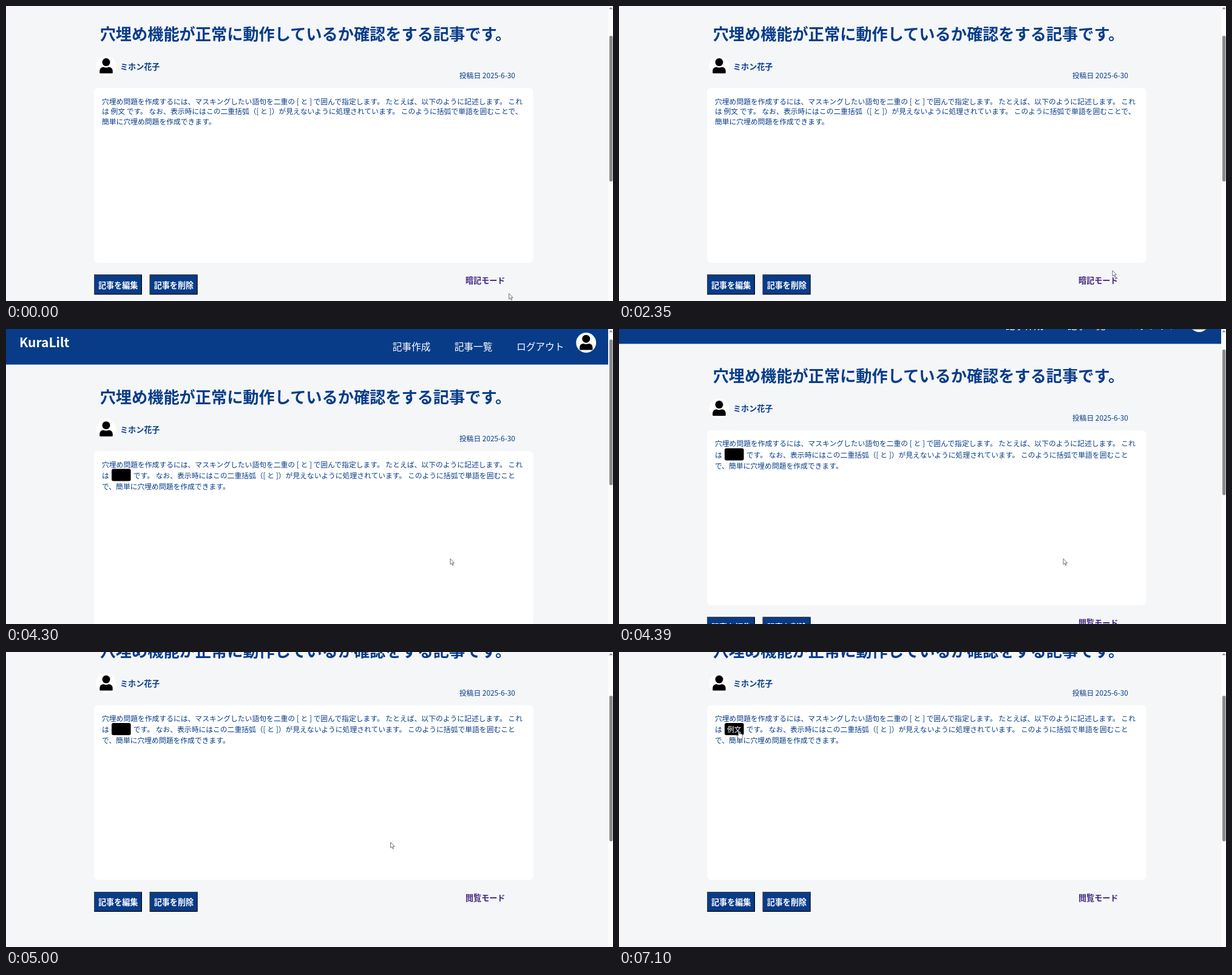
Recreate the animation shown at these times as an HTML page. Size 1000 by 486 pixels, loop 8000 ms.

```html
<!DOCTYPE html>
<html lang="ja">
<head>
<meta charset="utf-8">
<style>
html, body { margin: 0; width: 100%; height: 100%; overflow: hidden; background: #f4f6f8; }
svg { display: block; font: 11.8px "Noto Sans CJK JP", "Noto Sans CJK", sans-serif; fill: #083c89; }
.bold { font-size: 13.1px; font-weight: 700; }
.title { font-size: 26.2px; font-weight: 700; }
.logo { font-size: 21px; font-weight: 700; }
.nav { font-size: 15.7px; }
.white { fill: #fff; }
.link { fill: #45297f; }
.cursor { fill: #fff; stroke: #444; stroke-width: .75; stroke-linejoin: round; }
</style>
</head>
<body>
<svg width="1000" height="486" viewBox="0 0 1000 486">
  <defs>
    <g id="avatar">
      <circle r="16.5" fill="#fff"/>
      <circle cy="-6.4" r="6.5" fill="#000"/>
      <path d="M-10.8 11Q-11.6 1.6-4.5 1.4Q0 3.6 4.5 1.4Q11.6 1.6 10.8 11Q10.8 12 9.5 12H-9.5Q-10.8 12-10.8 11Z" fill="#000"/>
    </g>
    <g id="button">
      <rect width="79" height="33" fill="#000"/>
      <path d="M0 0H79L78 1H1V32L0 33Z" fill="#4a4a4a"/>
      <rect x="1" y="1" width="76.8" height="30.8"/>
    </g>
  </defs>
  <rect width="1000" height="486" fill="#f4f6f8"/>
  <g id="page">
    <rect width="992" height="76"/>
    <g class="white">
      <text class="logo" x="22" y="47.5">KuraLilt</text>
      <g class="nav">
        <text x="636.7" y="52">記事作成</text>
        <text x="738.7" y="52">記事一覧</text>
        <text x="841" y="52">ログアウト</text>
      </g>
    </g>
    <use href="#avatar" x="955.7" y="40"/>
    <text class="title" x="154.7" y="139">穴埋め機能が正常に動作しているか確認をする記事です。</text>
    <use href="#avatar" x="165" y="182.5"/>
    <text class="bold" x="188" y="188">ミホン花子</text>
    <text x="746.8" y="202.5">投稿日 2025-6-30</text>
    <rect x="145" y="218.5" width="723.5" height="288" rx="7" fill="#fff"/>
    <text x="158" y="245">穴埋め問題を作成するには、マスキングしたい語句を二重の [ と ] で囲んで指定します。 たとえば、以下のように記述します。 これ</text>
    <g id="reading">
      <text x="158" y="261.8">は 例文 です。 なお、表示時にはこの二重括弧（[ と ]）が見えないように処理されています。 このように括弧で単語を囲むことで、</text>
      <text x="158" y="278.6">簡単に穴埋め問題を作成できます。</text>
      <text class="bold link" x="757" y="540.5">暗記モード</text>
    </g>
    <g id="recall">
      <text x="158" y="263.2">は</text>
      <rect x="174" y="248" width="31.6" height="20" rx="3" fill="#000"/>
      <text id="answer" class="white" x="178" y="263.2">例文</text>
      <text x="209.8" y="263.2">です。 なお、表示時にはこの二重括弧（[ と ]）が見えないように処理されています。 このように括弧で単語を囲むこと</text>
      <text x="158" y="281.2">で、簡単に穴埋め問題を作成できます。</text>
      <text class="bold link" x="757" y="540.5">閲覧モード</text>
    </g>
    <use href="#button" x="145" y="526"/>
    <use href="#button" x="236.7" y="526"/>
    <g class="bold white">
      <text x="152" y="548">記事を編集</text>
      <text x="243.7" y="548">記事を削除</text>
    </g>
  </g>
  <rect x="992" width="8" height="486" fill="#fcfcfc"/>
  <path d="M993.3 5.3L996.5 2L999.7 5.3Z" fill="#8b8b8b"/>
  <rect id="thumb" x="994" width="5.5" height="240" rx="2.7" fill="#8b8b8b"/>
  <g id="cursor" class="cursor">
    <path id="arrow" d="M0 0V9.3L2.1 7.4L3.7 10.9L5.1 10.3L3.6 6.9H6.5Z"/>
    <path id="hand" d="M-1 6.5V.9Q0-.8 1 .9V4.2Q2 0 3 4.6Q4 3.7 4.7 5Q6 4.3 6.2 6V9Q6.2 10.5 5 12.5H-.6Q-1.5 10.5-3.6 7.6Q-3.4 5.4-1 7.6Z"/>
  </g>
</svg>
<script>
const LOOP = 8000, STEP = 70, SWAP = 3450;
const LINK = { x: 783, y: 456 };
const moves = [
  { from: 3880, to: 4300, x: 732, y: 378.5 },
  { from: 4930, to: 5350, x: 410, y: 217.5 },
  { from: 5560, to: 6120, x: 293.5, y: 180.5 },
  { from: 6260, to: 6470, x: 247, y: 155 },
  { from: 6610, to: 7100, x: 197.5, y: 130.5 }
];
const $ = id => document.getElementById(id);
const show = (id, on) => $(id).setAttribute('visibility', on ? 'visible' : 'hidden');
const move = (id, x, y) => $(id).setAttribute('transform', `translate(${x} ${y})`);
const progress = (t, from, to) => Math.min(1, Math.max(0, (t - from) / (to - from)));

// Two slowing turns around the link, closing in on it
function circleLink(t) {
  const p = progress(t, 380, 2900);
  const angle = .95 + 12.07 * (1 - (1 - p) ** 1.4);
  const radius = 1.12 * Math.sqrt(1 - p ** 3);
  return {
    x: LINK.x + 70 * radius * Math.cos(angle),
    y: LINK.y - 7 * (1 - p) + 27 * radius * Math.sin(angle)
  };
}

// Later moves slow down along a slight upward arc
function pointerAt(t) {
  let pos = circleLink(t);
  for (const { from, to, x, y } of moves) {
    const e = 1 - (1 - progress(t, from, to)) ** 2;
    const dx = x - pos.x, dy = y - pos.y;
    pos = { x: pos.x + dx * e, y: pos.y + dy * e + .06 * dx * Math.sin(Math.PI * e) };
  }
  return pos;
}

function scrollAt(t) {
  const p = progress(t, 4220, 4570);
  return 131 * p * p * (3 - 2 * p);
}

function draw(now) {
  const t = now % LOOP;
  const tick = Math.floor((t - 30) / STEP) * STEP + 30;
  const { x, y } = pointerAt(tick);
  const recall = t >= SWAP;
  const scroll = recall ? scrollAt(tick) : 83.5;
  const onLink = t < 3570 && x > 757 && x < 822 && y > 444 && y < 462;
  const onBlank = recall && x > 174 && x < 205.6 && y + scroll > 248 && y + scroll < 268;
  move('page', 0, -scroll);
  move('thumb', 0, 9 + scroll * .48);
  move('cursor', x, y);
  show('reading', !recall);
  show('recall', recall);
  show('answer', onBlank);
  show('hand', onLink || onBlank);
  show('arrow', !onLink && !onBlank);
  requestAnimationFrame(draw);
}
requestAnimationFrame(draw);
</script>
</body>
</html>
```
